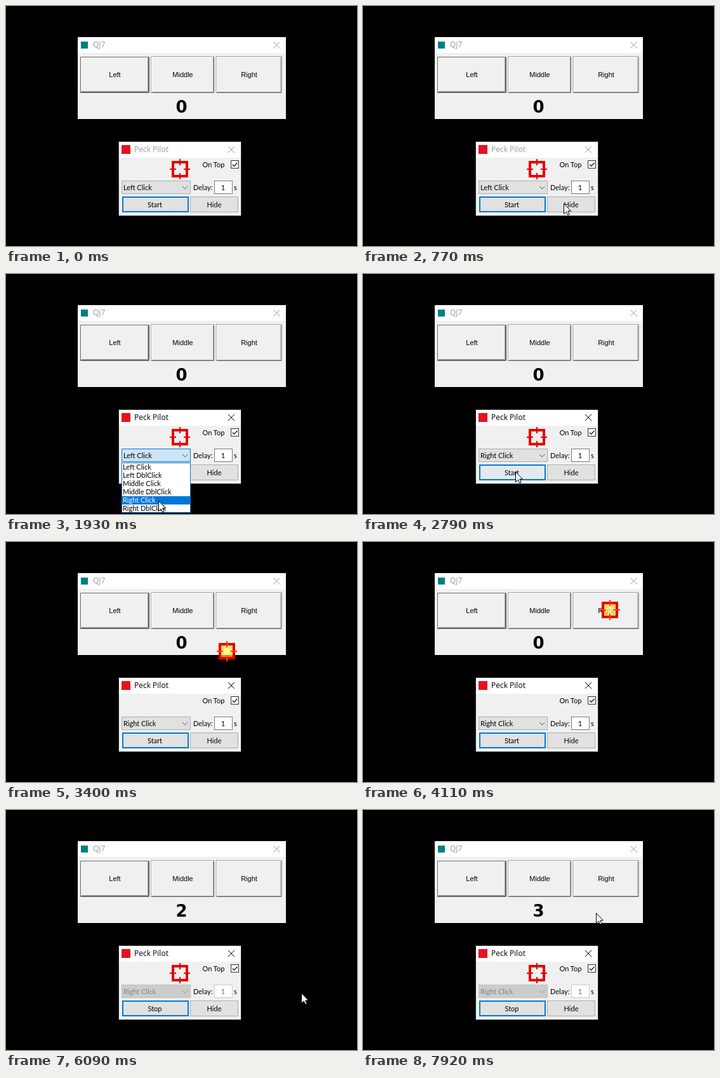
An HTML page that plays this animation: 553x378 px, repeating every 8000 ms.

```html
<!DOCTYPE html>
<html lang="en">
<head>
<meta charset="utf-8">
<title>Clicker demo</title>
<style>
  html, body { margin: 0; width: 100%; height: 100%; overflow: hidden; background: #000; }
  svg { display: block; width: 553px; height: 378px; }
  rect { shape-rendering: crispEdges; }
  text { font: 11px Lato, "Open Sans", sans-serif; fill: #000; white-space: pre; }
  .title { font: 12px "Open Sans", "Noto Sans", sans-serif; }
  .vb { font: 11px "Liberation Sans", Arial, sans-serif; text-anchor: middle; }
  .mid { text-anchor: middle; }
  #count { font: bold 26px "DejaVu Sans", Verdana, sans-serif; text-anchor: middle; }
</style>
</head>
<body>
<svg viewBox="0 0 553 378">
  <defs>
    <clipPath id="reveal"><rect id="revealBox" x="182" y="295" width="110" height="82"/></clipPath>
    <radialGradient id="glow">
      <stop offset=".2" stop-color="#ffff90"/>
      <stop offset="1" stop-color="#ffc820"/>
    </radialGradient>
    <g id="sight" fill="none" stroke="#e80000">
      <rect x="-11" y="-11" width="22" height="22" stroke-width="4"/>
      <path d="M-16 0h10M6 0h10M0-16v10M0 6v10" stroke-width="2"/>
    </g>
  </defs>

  <!-- counter window -->
  <rect x="113" y="49" width="328" height="129" fill="#f0f0f0"/>
  <rect x="113" y="49" width="328" height="25" fill="#fff"/>
  <rect x="118" y="56" width="11" height="11" fill="#008080"/>
  <text class="title" x="137" y="65" style="fill:#999">QJ7</text>
  <path d="M421.5 56.5l10 10m0-10l-10 10" stroke="#999"/>
  <g id="buttons"></g>
  <text id="count" x="276.5" y="168">0</text>

  <!-- clicker window -->
  <rect id="frame" x="177.5" y="213.5" width="193" height="117" fill="#f0f0f0"/>
  <rect x="178" y="214" width="192" height="25" fill="#fff"/>
  <rect x="182" y="219" width="14" height="14" fill="#e81020"/>
  <text id="name" class="title" x="202" y="230">Peck Pilot</text>
  <path id="close" d="M350 221l10 10m0-10l-10 10"/>
  <use id="home" href="#sight" x="274" y="257"/>
  <text x="309.5" y="254">On Top</text>
  <rect x="354.5" y="243.5" width="12" height="12" fill="#fff" stroke="#333"/>
  <path d="M357 249.5l2.6 2.8 5-5.6" fill="none" stroke="#222" stroke-width="1.3"/>
  <rect id="combo" x="182.5" y="275.5" width="108" height="20"/>
  <text id="mode" x="185" y="290"></text>
  <path id="chevron" d="M278 284l4.2 4.2 4.2-4.2" fill="none"/>
  <text x="295" y="290">Delay:</text>
  <rect id="field" x="328.5" y="275.5" width="28" height="20" fill="#fff"/>
  <text id="delay" class="mid" x="342" y="290">1</text>
  <text x="359" y="290">s</text>
  <rect id="start" x="184" y="301" width="103" height="23" stroke="#0078d7" stroke-width="2"/>
  <text id="action" class="mid" x="234.5" y="317"></text>
  <rect x="290.5" y="300.5" width="75" height="24" fill="#e1e1e1" stroke="#adadad"/>
  <text class="mid" x="328" y="317">Hide</text>

  <g id="list" clip-path="url(#reveal)"><g id="sheet">
    <rect x="182.5" y="297.5" width="108" height="78" fill="#fff" stroke="#0078d7"/>
    <rect id="bar" x="183" width="107" height="13" fill="#0078d7"/>
  </g></g>

  <g id="drag">
    <rect x="-10" y="-10" width="20" height="20" rx="5" fill="url(#glow)" opacity=".75"/>
    <use href="#sight"/>
    <path d="M-16 0h10M6 0h10M0-16v10M0 6v10" stroke="#ff8000"/>
  </g>
  <path id="arrow" d="M.5.5v16l3.7-3.5 2.5 5.2 2.4-1.1-2.4-5.1h4.8z" fill="#fff" stroke="#000"/>
</svg>
<script>
const LOOP = 8000, STEP = 77.7;
const $ = id => document.getElementById(id);
const set = (id, attrs) => { for (const k in attrs) $(id).setAttribute(k, attrs[k]); };
const show = (id, on) => set(id, { visibility: on ? 'visible' : 'hidden' });
const fill = (id, color) => { $(id).style.fill = color; };

const face = [225, 225, 225], hover = [229, 241, 251], down = [204, 228, 247], off = [204, 204, 204];

// Keys: time followed by values
const pointer = [
  [212, 448, 392], [290, 445, 370], [980, 254, 283], [1320, 254, 283], [1920, 240, 357],
  [2580, 240, 357], [2770, 240, 311], [2860, 240, 311], [3080, 274, 257], [3160, 274, 257],
  [3390, 347, 173], [3780, 384, 116], [4090, 389, 107], [4360, 389, 107], [5000, 240, 319],
  [5420, 240, 319], [5710, 493, 304], [5940, 493, 304], [6035, 465, 288], [6125, 465, 288],
  [6500, 389, 229], [6700, 389, 229], [6810, 378, 172], [7070, 378, 172], [7120, 391, 167],
  [7400, 391, 167], [7430, 391, 166], [7700, 391, 166], [7900, 367, 162]
];
const comboFill = [
  [960, ...face], [980, ...hover], [1080, ...hover], [1140, ...down], [2150, ...down],
  [2480, ...face], [5110, ...face], [5350, ...off]
];
const startFill = [
  [2680, ...face], [2900, ...hover], [3100, ...face], [4900, ...face], [5000, ...hover],
  [5050, ...down], [5130, ...down], [5350, ...hover], [5500, ...hover], [5720, ...face]
];

function at(keys, t) {
  const i = keys.findIndex(k => k[0] > t);
  if (i === 0) return keys[0].slice(1);
  if (i < 0) return keys[keys.length - 1].slice(1);
  const a = keys[i - 1], b = keys[i], p = (t - a[0]) / (b[0] - a[0]);
  return a.slice(1).map((v, n) => v + (b[n + 1] - v) * p);
}
const rgb = c => `rgb(${c.map(Math.round)})`;

function bevel(x, w, label, main) {
  const y = 80, h = 57, r = x + w, b = y + h;
  const line = (d, c) => `<path d="${d}" fill="none" stroke="${c}"/>`;
  const i = main ? 1 : 0;
  return line(`M${x + i + .5} ${b - i - 1}V${y + i + .5}H${r - i - 1}`, '#fff') +
    line(`M${x + i + 1} ${b - i - 1.5}H${r - i - 1.5}V${y + i + 1}`, '#a0a0a0') +
    line(`M${x + i} ${b - i - .5}H${r - i - .5}V${y + i}`, '#696969') +
    (main ? line(`M${x + .5} ${y + .5}H${r - .5}V${b - .5}H${x + .5}Z`, '#646464')
          : line(`M${x - .5} ${b}V${y - .5}H${r}`, '#a0a0a0')) +
    `<text class="vb" x="${x + w / 2}" y="112">${label}</text>`;
}
$('buttons').innerHTML = bevel(117, 109, 'Left', true) + bevel(229, 99, 'Middle') + bevel(331.5, 103, 'Right');

const rows = ['Left', 'Middle', 'Right'].flatMap(b => [b + ' Click', b + ' DblClick']).map((label, i) => {
  const row = document.createElementNS('http://www.w3.org/2000/svg', 'text');
  row.textContent = label;
  row.setAttribute('x', 184);
  row.setAttribute('y', 308 + i * 13);
  return $('sheet').appendChild(row);
});

function draw(t) {
  const tick = 290 + STEP * Math.floor((t - 290) / STEP + .25);
  const [x, y] = at(pointer, tick).map(Math.round);
  const active = t >= 980, running = t >= 5110;
  const dragging = t >= 3150 && t < 4260;
  const open = t >= 1060 && t < 2160, sliding = t < 1150;

  set('frame', { stroke: active ? '#222' : '#333' });
  fill('name', active ? '#000' : '#999');
  set('close', { stroke: active ? '#000' : '#999' });
  $('count').textContent = running + (t >= 6090) + (t >= 7150);

  set('combo', {
    fill: rgb(at(comboFill, t)),
    stroke: active && t < 2160 ? '#0078d7' : running ? '#bfbfbf' : '#adadad'
  });
  $('mode').textContent = t < 2160 ? 'Left Click' : 'Right Click';
  fill('mode', running ? '#838383' : '#000');
  set('chevron', { stroke: running ? '#9a9a9a' : '#555' });
  set('field', { stroke: running ? '#ccc' : '#7a7a7a' });
  fill('delay', running ? '#6d6d6d' : '#000');
  set('start', { fill: rgb(at(startFill, t)) });
  $('action').textContent = running ? 'Stop' : 'Start';

  show('list', open);
  set('revealBox', { height: sliding ? 69 : 82 });
  set('sheet', { transform: `translate(0 ${sliding ? -4 : 0})` });
  const picked = Math.max(0, Math.min(5, Math.floor((y - 298) / 13)));
  set('bar', { y: 298 + picked * 13 });
  rows.forEach((row, i) => { row.style.fill = i === picked ? '#fff' : '#000'; });

  show('home', !dragging);
  show('drag', dragging);
  show('arrow', t >= 290 && !dragging);
  set('drag', { transform: `translate(${x} ${y})` });
  set('arrow', { transform: `translate(${x} ${y})` });
}

const begin = performance.now();
function loop() {
  draw((performance.now() - begin) % LOOP);
  requestAnimationFrame(loop);
}
loop();
</script>
</body>
</html>
```
